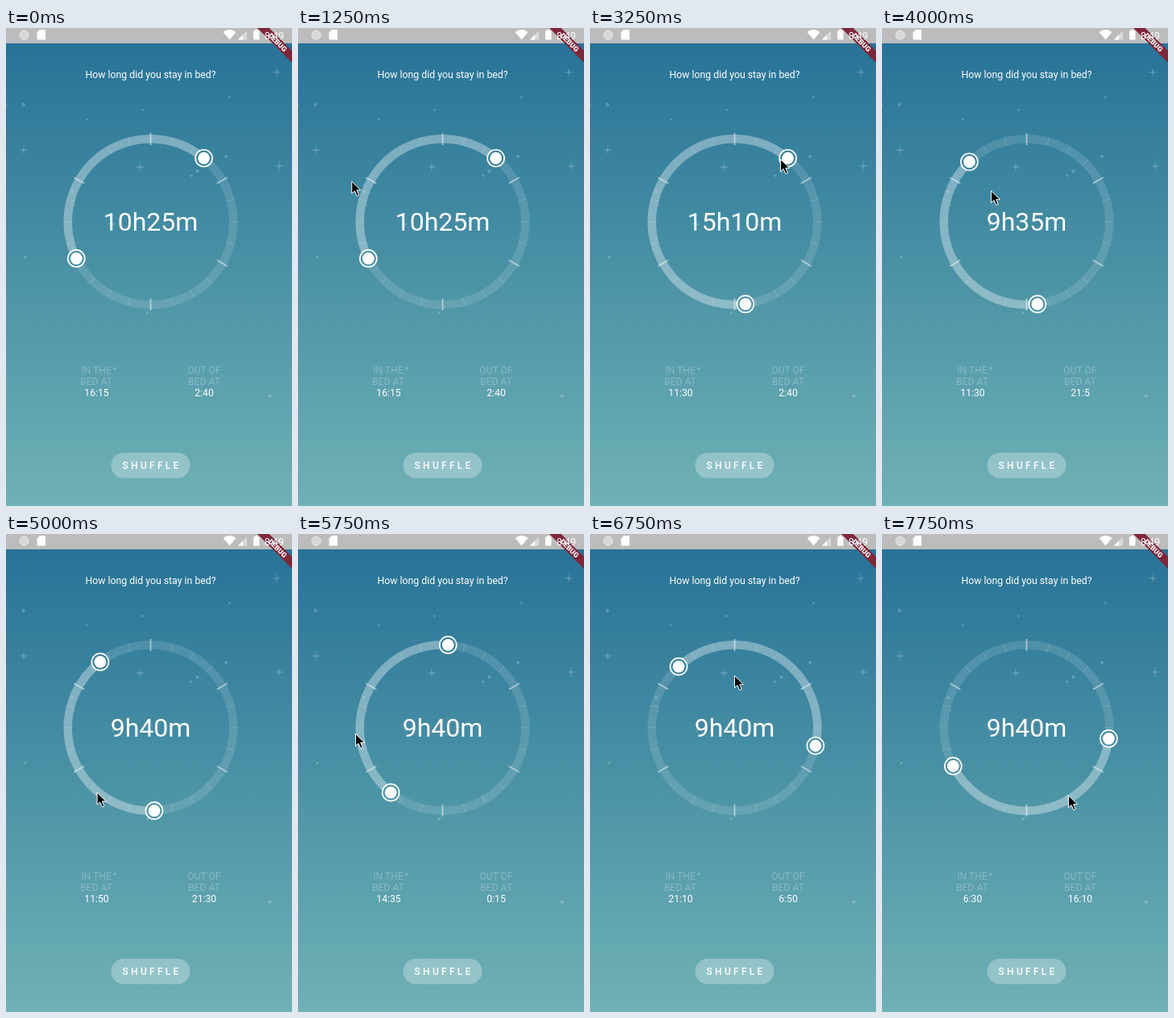
Write an HTML page that moves like this. It is 355 by 592 pixels and loops after 8000 ms.

```html
<!DOCTYPE html>
<html lang="en">
<head>
<meta charset="utf-8">
<title>Bed time</title>
<style>
  html, body { margin: 0; width: 100%; height: 100%; overflow: hidden; }
  svg { display: block; width: 355px; height: 592px; font: 12.2px Roboto, sans-serif; fill: #fff; }
  .mid { text-anchor: middle; }
  .label { opacity: .27; }
</style>
</head>
<body>
<svg viewBox="0 0 355 592">
  <defs>
    <linearGradient id="sky" gradientUnits="userSpaceOnUse" x1="0" y1="19" x2="0" y2="592">
      <stop stop-color="#277397"/>
      <stop offset="1" stop-color="#6fb1b5"/>
    </linearGradient>
    <g id="knob">
      <circle r="10.5" stroke="#fff" stroke-width="1.7"/>
      <circle r="7.4" fill="#fff"/>
    </g>
    <path id="sparkle" d="M0-6.500L.9-.9L6.500 0L.9 .9L0 6.500L-.9 .9L-6.500 0L-.9-.9z"/>
  </defs>

  <rect width="355" height="592" fill="url(#sky)"/>
  <g id="stars" opacity=".22">
    <use href="#sparkle" x="336" y="55"/>
    <use href="#sparkle" x="22" y="151"/>
    <use href="#sparkle" x="166" y="172"/>
    <use href="#sparkle" x="339" y="171"/>
  </g>

  <rect width="355" height="19" fill="#bdbcbc"/>
  <g transform="translate(355 0) rotate(45)">
    <rect x="-40" y="20" width="80" height="10.4" fill="#7f2639"/>
    <text class="mid" y="28.300" font-size="8.8" font-weight="900">DEBUG</text>
  </g>
  <circle cx="22.5" cy="8.7" r="5.5" fill-opacity=".4" stroke="#fff" stroke-opacity=".6"/>
  <path d="M42 2h7v12.5H38.500V5.500z"/>
  <path d="M269.500 5Q277.500 -1 285.500 5L277.500 14.500z"/>
  <path d="M288 14.500L299 3.500V14.500z" opacity=".45"/>
  <path d="M288 14.500L294 8.500V14.500z"/>
  <path d="M307 3.500h2V2h3.500v1.500h2V14.500h-7.500z"/>
  <text x="320.700" y="13.500" font-size="12.6">8:49</text>

  <text class="mid" x="179.500" y="61.700" font-size="12.3">How long did you stay in bed?</text>

  <g fill="none" stroke="#fff" stroke-width="10.500">
    <circle cx="179.500" cy="240" r="102.800" stroke-opacity=".13"/>
    <circle id="arc" cx="179.500" cy="240" r="102.800" stroke-opacity=".26" pathLength="1440"/>
  </g>
  <g id="ticks" stroke="#fff"></g>
  <use id="startKnob" href="#knob"/>
  <use id="endKnob" href="#knob"/>
  <text class="mid" id="span" x="179.500" y="251" font-size="32"></text>

  <g class="mid">
    <g class="label">
      <text x="112" y="427.700">IN THE</text><text x="112" y="441.700">BED AT</text>
      <text x="246" y="427.700">OUT OF</text><text x="246" y="441.700">BED AT</text>
    </g>
    <text id="start" x="112.500" y="455.700"></text>
    <text id="end" x="246" y="455.700"></text>
  </g>

  <rect x="130.500" y="526" width="98" height="31.500" rx="15.750" fill-opacity=".29"/>
  <text x="144.500" y="546.300" font-size="12" font-weight="500" letter-spacing="3.3">SHUFFLE</text>

  <path id="cursor" d="M.5 .5V15.500L4 12.300L6.700 18.300L9.300 17.200L6.700 11.300H11.500z" fill="#000" stroke="#fff"/>
</svg>

<script>
const $ = id => document.getElementById(id);
const CX = 179.5, CY = 240, R = 102.8, DAY = 1440, STEP = 250, LOOP = 8000;

let seed = 8;
const random = () => (seed = seed * 16807 % 2147483647) / 2147483647;
for (let i = 0; i < 15; i++) {
  const x = 355 * random(), y = 75 + 390 * random(), r = 1.2 + random();
  $('stars').innerHTML += `<circle cx="${x}" cy="${y}" r="${r}"/>`;
}

for (let i = 0; i < 24; i++) {
  const major = i % 4 === 0;
  $('ticks').innerHTML += `<path d="${major ? 'M0-110v15' : 'M0-108v10.6'}"
    transform="translate(${CX} ${CY}) rotate(${i * 15})"
    stroke-width="${major ? 1.8 : 1}" stroke-opacity="${major ? .5 : .16}"/>`;
}

// Knob gaps hide the ring with the sky colour at their height
const skyAt = y => {
  const k = (y - 19) / 573;
  return `rgb(${39 + 72 * k},${115 + 62 * k},${151 + 30 * k})`;
};

const progress = (step, from, to) => Math.min(1, Math.max(0, (step - from) / (to - from)));
const easeInOut = p => p * p / (p * p + (1 - p) ** 2);
const snap = m => Math.round(m / 5) * 5;
const wrap = m => (m % DAY + DAY) % DAY;
const split = m => [Math.floor(wrap(m) / 60), wrap(m) % 60];

// Drag the start, drag the end, then spin the whole arc; minutes of the day
const startAt = step => snap(975 - 285 * progress(step, 6, 12) ** 1.37
  + 1140 * progress(step, 18.9, 31) ** 1.682);
const endAt = step => step > 16 ? startAt(step) + 580
  : snap(160 - 335 * easeInOut(progress(step, 13, 16)));

function polar(degrees, radius) {
  const a = degrees * Math.PI / 180;
  return [CX + radius * Math.sin(a), CY - radius * Math.cos(a)];
}

// Pointer stops: [step, degrees, distance from the dial's centre]
const stops = [[5, 294, 124], [6, 244, 108], [9, 214.6, 99.6], [12, 172, 99], [13, 36, 96.3],
  [16, -48.8, 59.2], [20, -140, 104], [23, -93.7, 108.7], [27, -.4, 65], [31, 148.3, 98]];

function pointerAt(step) {
  if (step === 1) return [50, 557];
  if (step < 5) return null;
  const i = Math.max(1, stops.findIndex(s => s[0] >= step));
  const [from, a, r] = stops[i - 1], [to, b, q] = stops[i];
  const p = progress(step, from, to);
  return polar(a + (b - a) * p, r + (q - r) * p);
}

const move = (el, [x, y]) => el.setAttribute('transform', `translate(${x} ${y})`);

function placeKnob(knob, minutes) {
  const spot = polar(minutes / 4, R);
  move(knob, spot);
  knob.setAttribute('fill', skyAt(spot[1]));
}

function draw(step) {
  const start = startAt(step), end = endAt(step);
  const span = wrap(end - start), [h, m] = split(span);

  placeKnob($('startKnob'), start);
  placeKnob($('endKnob'), end);
  $('arc').setAttribute('stroke-dasharray', `${span} ${DAY - span}`);
  $('arc').setAttribute('transform', `rotate(${start / 4 - 90} ${CX} ${CY})`);
  $('span').textContent = `${h}h${m}m`;
  $('start').textContent = split(start).join(':');
  $('end').textContent = split(end).join(':');

  const pointer = pointerAt(step);
  $('cursor').style.display = pointer ? '' : 'none';
  if (pointer) move($('cursor'), pointer);
}

function tick() {
  draw(Math.floor(performance.now() % LOOP / STEP));
  requestAnimationFrame(tick);
}
tick();
</script>
</body>
</html>
```
